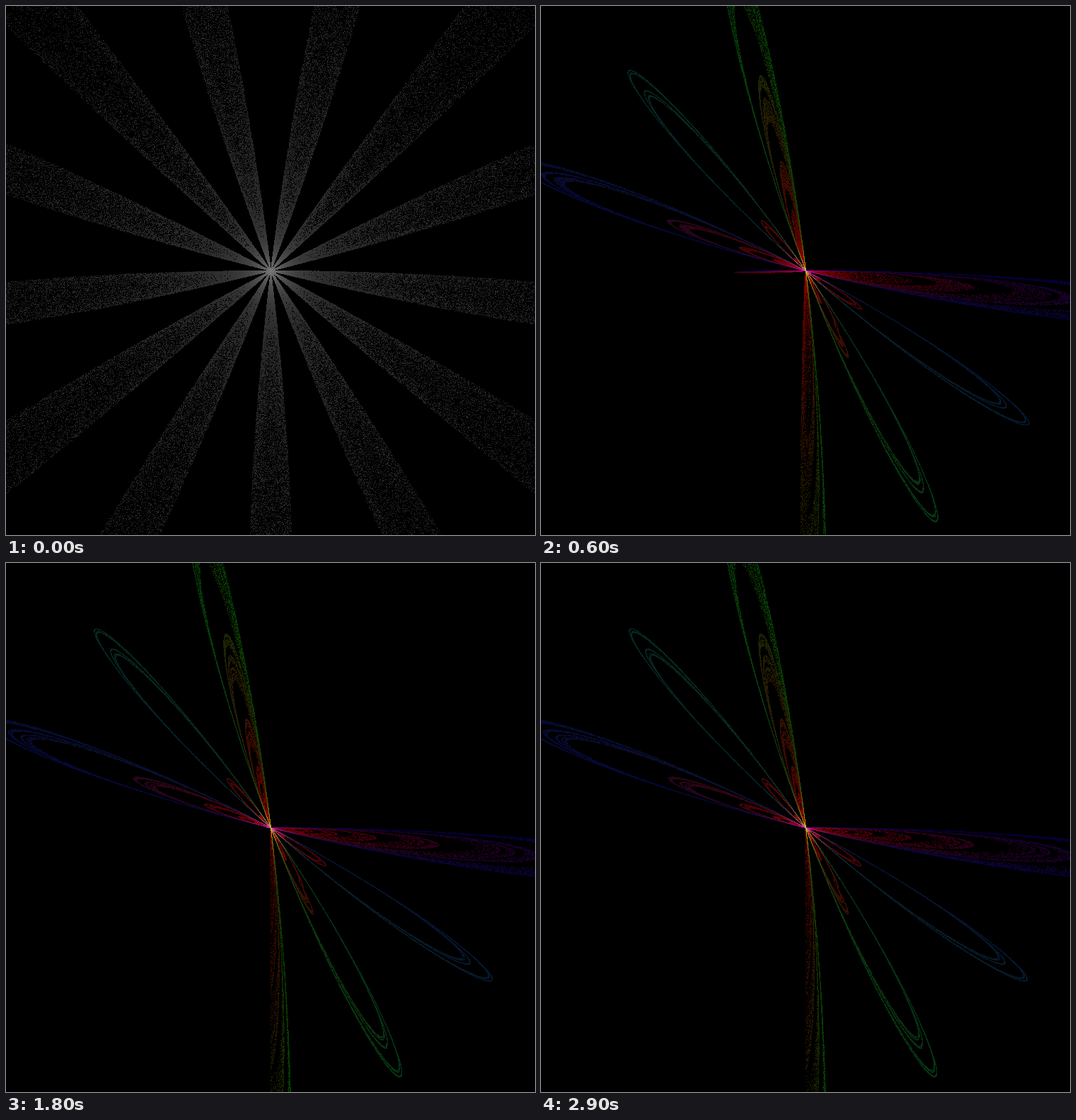
Animation, 748 px wide and 748 px high, one loop 3000 ms. Source, as an HTML page with a canvas:

```html
<!DOCTYPE html>
<html lang="en">
<head>
<meta charset="utf-8">
<title>Thirteen petals</title>
<style>
  html, body { margin: 0; width: 100%; height: 100%; overflow: hidden; background: #000; }
  canvas { display: block; width: 748px; height: 748px; }
</style>
</head>
<body>
<canvas id="stage" width="748" height="748"></canvas>
<script>
const SIZE = 748, MID = SIZE / 2, STEP = 100, STEPS = 30;
const PETALS = 13, POINTS = 240000, DEG = Math.PI / 180;
const ctx = document.getElementById('stage').getContext('2d');
const image = ctx.createImageData(SIZE, SIZE);
const pixels = image.data;

let seed = 1;
function rnd() {
  seed = (seed + 0x6d2b79f5) | 0;
  let t = Math.imul(seed ^ (seed >>> 15), 1 | seed);
  t = (t + Math.imul(t ^ (t >>> 7), 61 | t)) ^ t;
  return ((t ^ (t >>> 14)) >>> 0) / 4294967296;
}

// Overlapping points keep the brightest value of each channel
function plot(x, y, color, gain) {
  x = Math.floor(x);
  y = Math.floor(y);
  if (x < 0 || y < 0 || x >= SIZE || y >= SIZE) return;
  const i = (y * SIZE + x) * 4;
  color.forEach((v, c) => { pixels[i + c] = Math.max(pixels[i + c], v * gain); });
}

// Degrees away from the nearest diagonal: 0 on a diagonal, 45 on an axis
function offDiagonal(x, y) {
  return Math.abs(Math.atan2(Math.abs(y), Math.abs(x)) / DEG - 45);
}

// Petal length the cloud settles to
const limit = d => 375 + 0.0042 * d ** 3;

function reach(n, d, x, y) {
  if (n === 0) return 721 / Math.max(Math.abs(x), Math.abs(y)) ** 3;
  if (x * y > 0) return limit(d) * (1 + 0.5 ** (n + 1));
  return 1070 * Math.exp(-0.00975 * n ** 2.5 * (45 - d));
}

// Cantor-like position along a petal: a low copy and a thin band at the tip
function strand(depth, d, lean) {
  const low = 0.25 + 0.08 * Math.sqrt(Math.max(0, d - 17));
  const band = (0.13 + 0.2 * (d / 45) ** 2) * (1 + 0.6 * lean);
  let u = rnd();
  for (let i = 0; i < depth; i++) u = rnd() < 0.5 ? low * u : 1 - band * (1 - u);
  return u;
}

// Red for short strands, green and blue by direction
function tint(part, x, y, white) {
  const red = Math.exp(-((part / 0.6) ** 2));
  return [red, (1 - red) * Math.abs(y) ** 1.6, (1 - red) * Math.abs(x) ** 1.6]
    .map(v => white + (1 - white) * v);
}

function draw(n) {
  seed = 977 * (n + 1);
  for (let i = 0; i < pixels.length; i += 4) {
    pixels[i] = pixels[i + 1] = pixels[i + 2] = 0;
    pixels[i + 3] = 255;
  }
  const depth = Math.max(0, Math.min(7, n - 3));
  const white = n === 0 ? 1 : n === 1 ? 0.4 : 0;
  const gain = n === 0 ? 40 : n < 4 ? 55 : 68;

  for (let i = 0; i < POINTS; i++) {
    const angle = rnd() * 2 * Math.PI;
    const phase = PETALS * (angle - Math.PI / 2);
    const rose = Math.cos(phase);
    const x = Math.cos(angle), y = Math.sin(angle);
    const d = offDiagonal(x, y);
    const u = depth && x * y > 0
      ? strand(depth, d, Math.sin(phase) * Math.sign(rose))
      : rnd() ** 1.5;
    const a = reach(n, d, x, y) * u;
    const r = a * rose;
    const glow = 1 + 2 * Math.exp(-Math.abs(r) / 30);
    plot(MID + 0.5 + r * x, MID + 0.5 + r * y, tint(a / limit(d), x, y, white), gain * glow);
  }
  ctx.putImageData(image, 0, 0);
}

let shown = -1;
function tick() {
  const n = Math.floor(performance.now() / STEP) % STEPS;
  if (n !== shown) draw(shown = n);
  requestAnimationFrame(tick);
}
tick();
</script>
</body>
</html>
```
